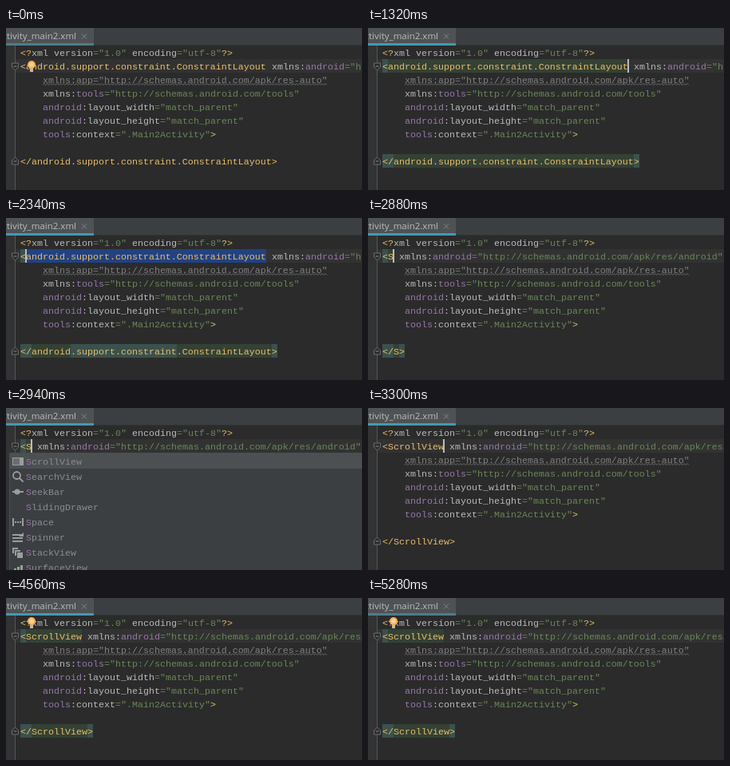
An HTML page with a canvas for the animation above (5340 ms loop, 446 px wide and 203 px high).

```html
<!DOCTYPE html>
<html lang="en">
<head>
<meta charset="utf-8">
<title>Editor</title>
<style>
html, body { margin: 0; width: 100%; height: 100%; overflow: hidden; background: #2b2b2b; }
canvas { display: block; }
</style>
</head>
<body>
<canvas id="stage" width="446" height="203"></canvas>
<script>
const g = document.getElementById('stage').getContext('2d');
const LOOP = 5340, LEFT = 18, TOP = 22, CHAR = 7, ROW = 17;
const CODE_FONT = '11.667px "Liberation Mono", monospace';
const TAB_FONT = '11.5px "Open Sans", sans-serif';
const TAG = '#e8bf6a', PLAIN = '#bababa', SPACE_NAME = '#9876aa', VALUE = '#6a8759',
      UNUSED = '#808080', ICON = '#9a9da0', BRACE = '#3b514d', USAGE = '#344134';
const SUGGESTIONS = ['ScrollView', 'SearchView', 'SeekBar', 'SlidingDrawer',
                     'Space', 'Spinner', 'StackView', 'SurfaceView'];

const colX = col => LEFT + col * CHAR;
const rowY = row => TOP + row * ROW;

function rect(color, x, y, w, h) {
  g.fillStyle = color;
  g.fillRect(x, y, w, h);
}

function mark(color, row, from, to) {
  rect(color, colX(from), rowY(row), (to - from) * CHAR, ROW);
}

function path(points, stroke, fill, width = 1) {
  g.beginPath();
  points.forEach(([x, y]) => g.lineTo(x, y));
  if (fill) { g.closePath(); g.fillStyle = fill; g.fill(); }
  if (stroke) { g.strokeStyle = stroke; g.lineWidth = width; g.stroke(); }
}

function circle(x, y, r, fill, stroke, width) {
  g.beginPath();
  g.arc(x, y, r, 0, Math.PI * 2);
  if (fill) { g.fillStyle = fill; g.fill(); }
  if (stroke) { g.strokeStyle = stroke; g.lineWidth = width; g.stroke(); }
}

// Draws colour/text pairs one after another on the character grid.
function write(x, baseline, ...parts) {
  g.font = CODE_FONT;
  for (let i = 0; i < parts.length; i += 2) {
    g.fillStyle = parts[i];
    g.fillText(parts[i + 1], x, baseline);
    x += parts[i + 1].length * CHAR;
  }
}

const line = (row, col, ...parts) => write(colX(col), rowY(row) + 13, ...parts);

function drawTabs(focused) {
  rect('#3c3f41', 0, 0, 446, 22);
  rect('#323232', 0, 21, 446, 1);
  rect('#4e5254', 0, 0, 110, 19);
  rect(focused ? '#4299b3' : '#4c7c8c', 0, 19, 110, 3);
  g.font = TAB_FONT;
  g.textAlign = 'right';
  g.fillStyle = '#bbbbbb';
  g.fillText('activity_main2.xml', 88, 14);
  g.textAlign = 'left';
  path([[95, 7.5], [101, 13.5]], '#7f8486');
  path([[101, 7.5], [95, 13.5]], '#7f8486');
}

function foldMarker(y, dir) {
  path([[7.5, y - 4 * dir], [15.5, y - 4 * dir], [15.5, y + dir], [11.5, y + 5 * dir], [7.5, y + dir], [7.5, y - 4 * dir]],
       '#6c6e70', '#2b2b2b');
  path([[9.5, y], [13.5, y]], '#8c8e90');
}

function drawBulb(y) {
  circle(32, y + 5, 5, '#f2b052');
  circle(32, y + 5, 3, '#f6cf94');
  rect('#f2b052', 30, y + 9, 4, 2);
  rect('#b5b7b9', 30, y + 11, 4, 3);
}

function drawCode(tag) {
  const attribute = (row, col, prefix, name, value) =>
    line(row, col, SPACE_NAME, prefix, PLAIN, ':' + name, VALUE, `="${value}"`);
  const namespace = (row, col, name, value) =>
    line(row, col, PLAIN, 'xmlns:', SPACE_NAME, name, VALUE, `="${value}"`);

  line(0, 0, TAG, '<?', PLAIN, 'xml version', VALUE, '="1.0"', PLAIN, ' encoding', VALUE, '="utf-8"', TAG, '?>');
  line(1, 0, TAG, '<' + tag);
  namespace(1, tag.length + 2, 'android', 'http://schemas.android.com/apk/res/android');
  line(2, 4, UNUSED, 'xmlns:app="http://schemas.android.com/apk/res-auto"');
  const wave = Array.from({ length: 179 }, (_, i) => [46 + i * 2, i % 2 ? 69.5 : 71.5]);
  path(wave, '#77797a', null, 0.8);
  namespace(3, 4, 'tools', 'http://schemas.android.com/tools');
  attribute(4, 4, 'android', 'layout_width', 'match_parent');
  attribute(5, 4, 'android', 'layout_height', 'match_parent');
  attribute(6, 4, 'tools', 'context', '.Main2Activity');
  line(6, 34, TAG, '>');
  line(8, 0, TAG, `</${tag}>`);
}

const icons = {
  ScrollView(y) {
    rect(ICON, 8, y - 5, 14, 10);
    rect('#6b6e70', 9, y - 4, 8, 8);
  },
  SearchView(y) {
    circle(13.5, y - 1.5, 4.5, null, ICON, 1.8);
    path([[17, y + 2], [21.5, y + 6.5]], ICON, null, 2);
  },
  SeekBar(y) {
    rect(ICON, 8, y - 1, 14, 2);
    circle(14, y, 3.5, ICON);
  },
  Space(y) {
    rect(ICON, 8, y - 5, 2, 10);
    rect(ICON, 20, y - 5, 2, 10);
    [11, 14, 17].forEach(x => rect(ICON, x, y - 1, 2, 2));
  },
  Spinner(y) {
    [-4, 0, 4].forEach(dy => rect(ICON, 8, y + dy, 13, 2));
    path([[16, y - 1], [22, y - 1], [22, y - 6]], null, ICON);
  },
  StackView(y) {
    [0, 3, 6].forEach(d => {
      rect('#3c3f41', 7 + d, y - 7 + d, 9, 9);
      rect(ICON, 8 + d, y - 6 + d, 7, 7);
    });
  },
  SurfaceView(y) {
    [0, 1, 2].forEach(i => rect(ICON, 10 + i * 4, y + 1 - i * 2, 3, 8));
  }
};

function drawPopup(active) {
  rect('#4b4e50', 4, 56, 442, 147);
  rect('#3c3f41', 5, 57, 441, 146);
  rect(active ? '#113a5c' : '#4c5052', 5, 57, 441, 19);
  SUGGESTIONS.forEach((name, i) => {
    const y = 67 + i * 19;
    icons[name]?.(y);
    write(25, y + 4, active ? '#d17ae2' : '#9a72ad', name[0], active ? '#bbbbbb' : '#8a8c8e', name.slice(1));
  });
}

function drawHighlights(t, tag) {
  mark(BRACE, 1, 0, 1);
  mark(USAGE, 1, 1, tag.length + 1);
  mark(BRACE, 8, 0, tag.length + 3);
  mark(USAGE, 8, 2, tag.length + 2);
  if (t >= 2040 && t < 2880) mark(BRACE, 8, t < 2340 ? 2 : 9, 28);
}

function selectionStart(t) {
  const step = Math.floor((t - 1320) / 60) * 60;
  const p = Math.min(1, Math.max(0, step / 540));
  return Math.floor(44 - 43 * p * p * (3 - 2 * p));
}

function caretColumn(t) {
  if (t < 960) return 57;
  if (t < 2880) return selectionStart(t);
  return t < 3300 ? 2 : 11;
}

function draw(t) {
  const tag = t < 2880 ? 'android.support.constraint.ConstraintLayout' : t < 3300 ? 'S' : 'ScrollView';
  const focused = t >= 720 && t < 5280;
  const blinkedOff = t >= 4560 && t < 5040;

  rect('#2b2b2b', 0, 0, 446, 203);
  rect('#313335', 0, TOP, 11, 181);
  rect('#323232', 0, rowY(1), 446, ROW);
  rect('#555555', 11, TOP, 1, 181);
  foldMarker(48, 1);
  foldMarker(167, -1);

  if (t >= 960 && !(t >= 3300 && t < 3480)) drawHighlights(t, tag);
  if (t >= 1320 && t < 2880) mark('#214283', 1, selectionStart(t), 44);

  drawCode(tag);
  if (focused && !blinkedOff) rect('#bbbbbb', colX(caretColumn(t)) - 1, rowY(1), 2, ROW);
  if (t < 960) drawBulb(41);
  if (t >= 4080) drawBulb(24);
  if (t >= 2940 && t < 3300) drawPopup(t >= 3060);
  drawTabs(focused);
}

const start = performance.now();
function tick() {
  draw((performance.now() - start) % LOOP);
  requestAnimationFrame(tick);
}
tick();
</script>
</body>
</html>
```
